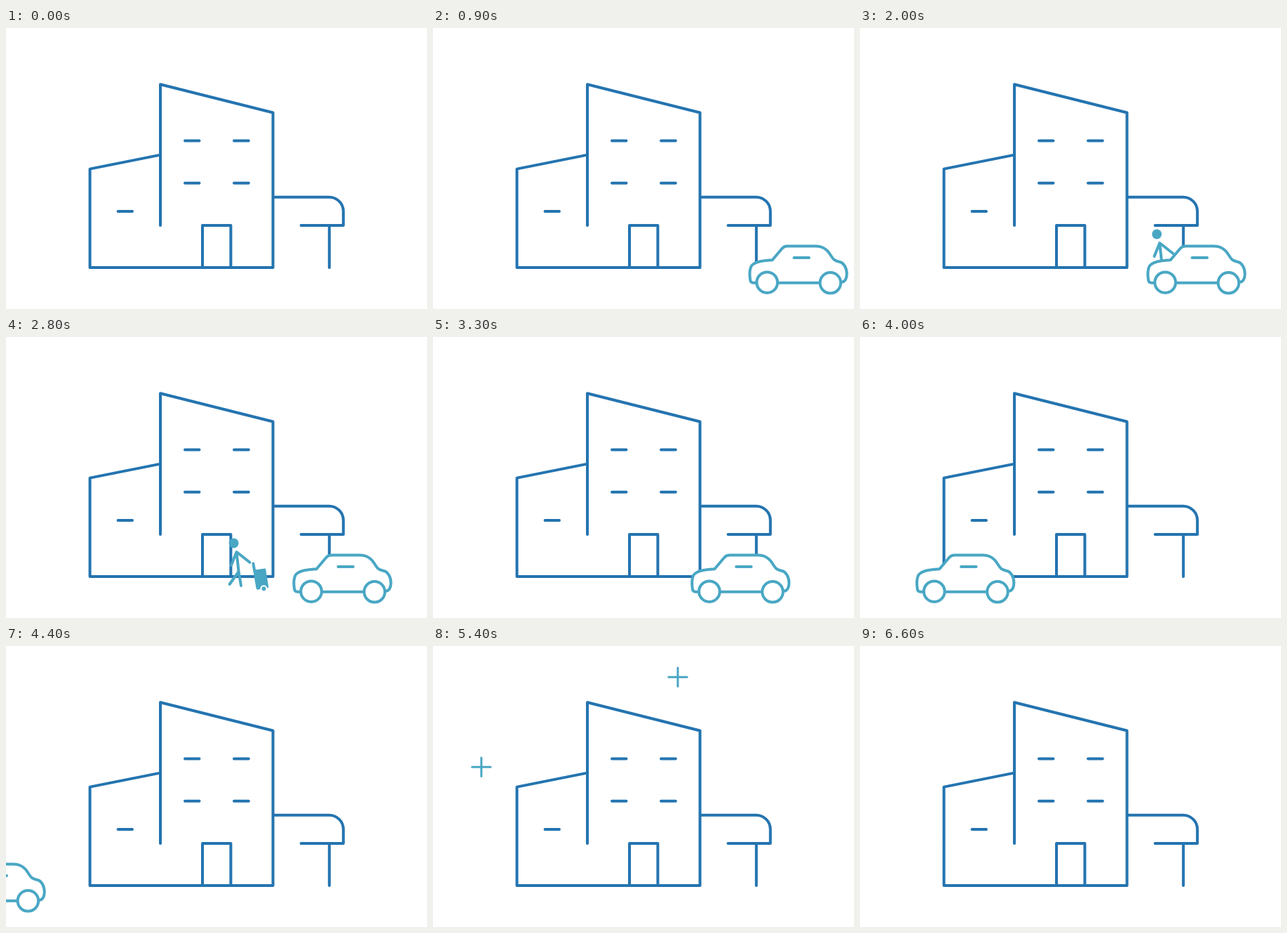
Write an HTML page with a canvas that moves like this. It is 600 px wide and 400 px high and loops after 7000 ms.

```html
<!DOCTYPE html>
<html lang="en">
<head>
<meta charset="utf-8">
<title>Arrival</title>
<style>
  html, body { margin: 0; width: 100%; height: 100%; overflow: hidden; background: #fff; }
  canvas { display: block; width: 600px; height: 400px; }
</style>
</head>
<body>
<canvas id="stage" width="600" height="400"></canvas>
<script>
const ctx = document.getElementById('stage').getContext('2d');
const LOOP = 7000, STEP = 100;
const BLUE = '#2474b0', TEAL = '#49a7c4', WHITE = '#fff';

const building = new Path2D(`
  M220 281V80.3L380.5 120.5V341H119.6V200.6L220 180.6
  M280 341V281H320.4V341Z M220 341H240
  M255 160.5H275.5 M325 160.5H345.8
  M255 220.7H275.5 M325 220.7H345.8 M159.6 261H180
  M380.5 240.7H460.5A20.3 20.3 0 0 1 480.8 261V281H420.5
  M460.8 281V341`);

const carBody = new Path2D(`
  M435 362.7H415.5Q411.6 362.7 411 359C409.8 351 409.6 345.5 412 340
  C414.5 334 424 331 442.5 330.2L456 314.2Q459 310.6 464 310.6H504
  C515 310.6 520.5 315.5 525 322.5C530 330.5 531.5 331.5 538.5 333
  C544.5 334.3 548.6 342 548.6 350.5C548.3 357 545.8 361.3 541.5 361.8L525 362.7Z`);

// Traveller, relative to the centre of the head
const limbs = new Path2D(`
  M22.8 27.3L4 12.5L-3.6 31.5 M4 12.5L7 40.5L10.4 60.5 M7 40.5L-6 58.5
  M27.8 29L34 64`);
const bag = new Path2D('M30.5 39L44.5 37L48.6 62.5L34.2 65Z');

const clamp = v => Math.min(1, Math.max(0, v));
const ramp = (t, from, to) => clamp((t - from) / (to - from));

function stroke(path, color, width) {
  ctx.strokeStyle = color;
  ctx.lineWidth = width;
  ctx.stroke(path);
}

function disc(x, y, r, fill) {
  const p = new Path2D();
  p.arc(x, y, r, 0, 2 * Math.PI);
  ctx.fillStyle = fill;
  ctx.fill(p);
  return p;
}

function drawTraveller(t) {
  if (t < 1600 || t >= 3200) return;
  const x = 460 - 0.1231 * (Math.min(t, 3000) - 1700) * (t > 1700);
  ctx.save();
  ctx.globalAlpha = 1 - ramp(t, 3000, 3200);
  ctx.translate(x, 293.5);
  stroke(limbs, TEAL, 4);
  ctx.fillStyle = TEAL;
  ctx.fill(bag);
  stroke(bag, TEAL, 2);
  disc(0, 0, 6.9, TEAL);
  disc(42.8, 64.7, 5, WHITE);
  disc(42.8, 64.7, 2.9, TEAL);
  ctx.restore();
}

function drawCar(t) {
  const speed = 0.4115;
  const shift = t < 1000 ? 1000 - t : Math.min(0, 3200 - t);
  ctx.save();
  ctx.translate(shift * speed, 0);
  ctx.fillStyle = WHITE;
  ctx.fill(carBody);
  stroke(carBody, TEAL, 4);
  stroke(new Path2D('M473.3 327H494.8'), TEAL, 4);
  stroke(disc(435, 362.2, 14.8, WHITE), TEAL, 4);
  stroke(disc(525.2, 362.8, 14.8, WHITE), TEAL, 4);
  ctx.restore();
}

const sparks = [
  { x: 348.9, y: 44.2, show: [4600, 5000], hide: [5700, 6000] },
  { x: 68.9, y: 172.2, show: [5000, 5400], hide: [5800, 6100] },
  { x: 509.5, y: 112, show: [5400, 5700], hide: [5900, 6200] },
  { x: 447, y: 192, show: [5500, 5900], hide: [6300, 6600] }
];

function drawSpark(t, { x, y, show, hide }) {
  const alpha = ramp(t, ...show) - ramp(t, ...hide);
  if (alpha <= 0) return;
  ctx.globalAlpha = alpha;
  stroke(new Path2D(`M${x - 13.2} ${y}h26.4M${x} ${y - 13.2}v26.4`), TEAL, 3);
  ctx.globalAlpha = 1;
}

function draw(now) {
  // The motion advances in tenths of a second
  const t = Math.floor((now % LOOP) / STEP) * STEP;
  ctx.fillStyle = WHITE;
  ctx.fillRect(0, 0, 600, 400);
  ctx.lineCap = ctx.lineJoin = 'round';
  stroke(building, BLUE, 4);
  drawTraveller(t);
  drawCar(t);
  sparks.forEach(s => drawSpark(t, s));
}

const start = performance.now();
function tick() {
  draw(performance.now() - start);
  requestAnimationFrame(tick);
}
tick();
</script>
</body>
</html>
```
